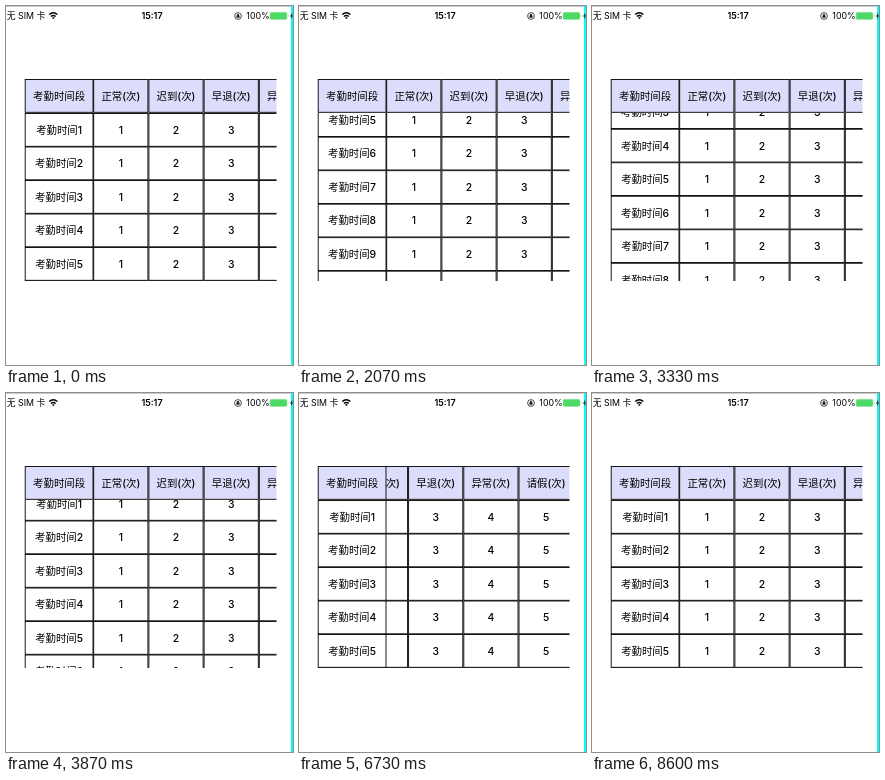
Animation, 287 px wide and 359 px high, one loop 9340 ms. Source, as an HTML page:

```html
<!DOCTYPE html>
<html lang="zh-CN">
<head>
<meta charset="utf-8">
<style>
  html, body { margin: 0; width: 100%; height: 100%; overflow: hidden; background: #fff; }
  svg { display: block; }
  text { font: 500 10.4px Inter, "Noto Sans CJK SC", "Noto Sans CJK", sans-serif; text-anchor: middle; }
  .status text { font-size: 8.8px; font-weight: 400; }
  .status .clock { font-size: 9px; font-weight: 600; }
  .cell { stroke: #000; stroke-width: .9; }
</style>
</head>
<body>
<svg width="287" height="359">
  <rect width="287" height="1" fill="#ccc"/>
  <rect x="285" width="2" height="359" fill="#0ff"/>
  <g class="status">
    <text x="20" y="13.2">无 SIM 卡</text>
    <g fill="none" stroke="#000" stroke-width="1.4">
      <path d="M43.2 8.6q4.1-3.8 8.2 0M44.9 10.5q2.4-2.2 4.8 0"/>
      <path d="M46.5 12h1.8" stroke-width="1.6"/>
    </g>
    <text class="clock" x="146" y="13.2">15:17</text>
    <circle cx="232" cy="10" r="3.4" fill="none" stroke="#222" stroke-width=".8"/>
    <path d="M230.4 9.5h3.2v2.3h-3.2zM231 9.5v-1q1-1.4 2 0v1" fill="#222"/>
    <text x="252" y="13.2">100%</text>
    <rect x="264" y="6.3" width="17" height="7.2" rx="1.6" fill="#4cd964" stroke="#9ddfa8" stroke-width=".6"/>
    <path d="M282.3 8.6q1.2 1.3 0 2.6z" fill="#4cd964"/>
    <path d="M286.4 6.5l-2.4 4h1.6l-.6 3 2-4h-1.3z" fill="#111"/>
  </g>
  <svg x="87" y="107" width="183.5" height="168"><g id="body"></g></svg>
  <svg x="18" y="107" width="70" height="168"><g id="side"></g></svg>
  <svg x="87" y="73" width="183.5" height="34.5"><g id="head"></g></svg>
  <svg x="18" y="73" width="70" height="34.5"><g id="corner"></g></svg>
</svg>
<script>
const LOOP = 9340, HOLD = 1000 / 3, START = 200;
const ROWS = 10, ROW_H = 33.5, COL_W = 55.2, SIDE_W = 68.8, LILAC = '#dcdcfb';
const COLS = ['正常', '迟到', '早退', '异常', '请假'];
const $ = id => document.getElementById(id);

function cell(x, y, w, label, fill = '#fff') {
  return `<rect class="cell" x="${x + .5}" y="${y + .5}" width="${w - 1}" height="${ROW_H - .7}" fill="${fill}"/>` +
    `<text x="${x + w / 2}" y="${y + 20.8}">${label}</text>`;
}

const rows = [...Array(ROWS).keys()];
const line = (y, label, fill) => COLS.map((name, c) => cell(c * COL_W + .2, y, COL_W, label(name, c), fill)).join('');
$('body').innerHTML = rows.map(r => line(r * ROW_H, (_, c) => c + 1)).join('');
$('side').innerHTML = rows.map(r => cell(.7, r * ROW_H, SIDE_W, '考勤时间' + (r + 1))).join('');
$('head').innerHTML = line(0, name => name + '(次)', LILAC);
$('corner').innerHTML = cell(.7, 0, SIDE_W, '考勤时间段', LILAC);

// Drags as [beat, offset]; the recording shows one position per beat
const DOWN = [[-1, 0], [3, 96.5], [6, 167.5], [7, 156.5], [11, 13], [13, 0]];
const ACROSS = [[14, 0], [16, 78], [18, 78], [19, 88.5], [22, 88.5], [24, 0]];

function at(keys, beat) {
  const next = keys.findIndex(k => k[0] > beat);
  if (next < 1) return 0;
  const [b0, v0] = keys[next - 1], [b1, v1] = keys[next];
  return v0 + (v1 - v0) * (beat - b0) / (b1 - b0);
}

const shift = (id, x, y) => $(id).setAttribute('transform', `translate(${-x} ${-y})`);

function draw(now) {
  const t = now % LOOP;
  const beat = Math.floor((t - START) / HOLD);
  const x = at(ACROSS, beat), y = t < START ? 0 : at(DOWN, beat);
  shift('body', x, y);
  shift('side', 0, y);
  shift('head', x, 0);
  requestAnimationFrame(draw);
}
draw(performance.now());
</script>
</body>
</html>
```
